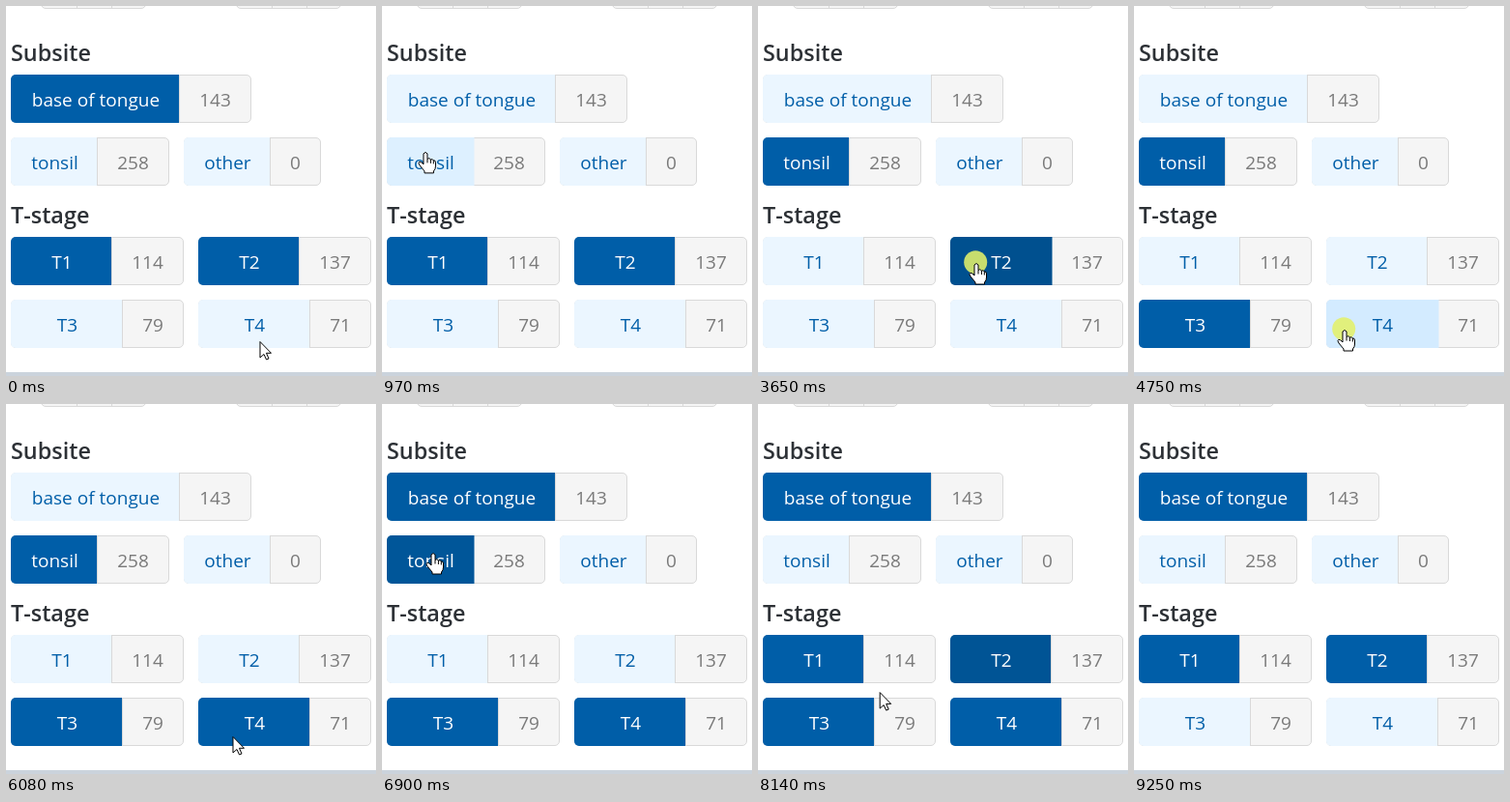
Animation of 383x383 px, one loop 9.89 s. Source, as an HTML page:

```html
<!DOCTYPE html>
<html lang="en">
<head>
<meta charset="utf-8">
<title>Filter buttons</title>
<style>
  html, body { margin: 0; height: 100%; overflow: hidden; background: #fff; }
  svg { display: block; width: 100%; height: 100%; cursor: default; }
  text { font: 19px "Open Sans", "Noto Sans", sans-serif; }
  .heading { font-size: 23.4px; font-weight: 600; font-kerning: none; fill: #2d3136; }
  .label, .count { text-anchor: middle; }
  .count { fill: #7a7a7a; }
  .box { fill: #f5f5f5; stroke: #d9d9d9; }
  .pointer { fill: #fff; stroke: #000; stroke-linejoin: round; }
</style>
</head>
<body>
<svg viewBox="0 0 383 383">
  <g id="page"></g>
  <circle id="press" cx="-.8" cy="-.8" r="12" fill="#e3f06a" opacity=".88"/>
  <path id="arrow" class="pointer" d="M0 .5V17L4 13.5L6.5 19L9 18L6.5 12.3H11.5Z"/>
  <path id="hand" class="pointer" d="M-2 2Q0-1 2 2V7.5Q4 5.5 5.4 8Q7.6 7 8.3 9Q10.5 8.5 10.5 11V15Q10.5 18 8.5 20V22H-1V20L-6 14Q-8 11-6.2 10.3Q-4.5 10-2 13ZM2 7.5V11.5M5.4 8V12M8.3 9V12.5"/>
</svg>
<script>
const LOOP = 9890, FADE = 150, HOVER_LAG = 35;
const ARRIVE = 90, HOLD = 130, LEAVE = 150; // ms around each press
const LEFT = 5, GAP = 15, HEIGHT = 50, RADIUS = 5;
const PALE = [235, 246, 255], PALE_HOVER = [211, 235, 255];
const BLUE = [0, 94, 168], BLUE_HOVER = [0, 80, 143];
const WHITE = [255, 255, 255];

// aim: where the pointer presses the button
const sections = [
  { title: "Subsite", rows: [
    [{ label: "base of tongue", count: 143, width: 249, on: true, aim: [34, 81] }],
    [{ label: "tonsil", count: 258, width: 164, aim: [45, 151] }, { label: "other", count: 0, width: 142 }],
  ] },
  { title: "T-stage", rows: [
    [{ label: "T1", count: 114, width: 179, on: true, aim: [75, 264] },
     { label: "T2", count: 137, width: 179, on: true, aim: [226, 266] }],
    [{ label: "T3", count: 79, width: 179, aim: [63, 310] },
     { label: "T4", count: 71, width: 179, aim: [218, 335] }],
  ] },
];
const buttons = sections.flatMap(section => section.rows.flat());
const clickable = buttons.filter(b => b.aim);

// Each stroke enters the stage, presses buttons at a steady pace and leaves.
const strokes = [
  { start: 0, end: 1580, from: [263, 347], to: [262, 400], first: 430, every: 640, targets: clickable.slice(0, 2) },
  { start: 2640, end: 5150, from: [217.5, 364], to: [228, 400], first: 2950, every: 577, targets: clickable.slice(2) },
  { start: 6080, end: 9250, from: [235, 344], to: [232, 400], first: 6495, every: 455, targets: clickable, shift: [8, 3] },
];
const presses = [];
for (const stroke of strokes) {
  const [dx, dy] = stroke.shift || [0, 0];
  stroke.keys = [{ time: stroke.start, point: stroke.from }];
  stroke.targets.forEach((button, i) => {
    const time = stroke.first + i * stroke.every;
    const point = [button.aim[0] + dx, button.aim[1] + dy];
    presses.push({ button, time });
    stroke.keys.push({ time: time - ARRIVE, point }, { time: time + LEAVE, point });
  });
  stroke.keys.push({ time: stroke.end, point: stroke.to });
}

function add(tag, attributes, content = "") {
  const node = document.createElementNS("http://www.w3.org/2000/svg", tag);
  for (const name in attributes) node.setAttribute(name, attributes[name]);
  node.textContent = content;
  return document.getElementById("page").appendChild(node);
}

function addBox(x, y, width, height) {
  add("rect", { class: "box", x: x + .5, y: y + .5, width: width - 1, height: height - 1, rx: RADIUS - .5 });
}

function addButton(b, x, y) {
  const right = x + b.width;
  const split = right - 42 - 11 * String(b.count).length;
  Object.assign(b, { x, y, split });
  addBox(x, y, b.width, HEIGHT);
  add("path", { class: "box", d: `M${split + .5} ${y}v${HEIGHT}` });
  b.face = add("path", {});
  b.text = add("text", { class: "label", x: (x + split) / 2 + 1, y: y + 33 }, b.label);
  add("text", { class: "count", x: (split + right) / 2, y: y + 33 }, b.count);
}

function buildPage() {
  for (const x of [36, 238]) {
    addBox(x, -47, 109, HEIGHT);
    for (const divider of [37, 73]) add("path", { class: "box", d: `M${x + divider + .5} 0V3` });
  }
  sections.forEach((section, s) => {
    const top = 71 + 168 * s;
    add("text", { class: "heading", x: LEFT, y: top - 14 }, section.title);
    section.rows.forEach((row, r) => {
      let x = LEFT;
      for (const b of row) {
        addButton(b, x, top + r * (HEIGHT + GAP));
        x += b.width + GAP;
      }
    });
  });
  add("rect", { y: 379, width: 383, height: 4, fill: "#cbd3dc" });
}

function faceShape({ x, y, split }, extra) {
  const r = RADIUS;
  return `M${x + r} ${y}H${split + extra}V${y + HEIGHT}H${x + r}a${r} ${r} 0 0 1-${r}-${r}V${y + r}a${r} ${r} 0 0 1 ${r}-${r}Z`;
}

function pointerAt(time) {
  const stroke = strokes.find(s => time >= s.start && time < s.end);
  if (!stroke) return [0, -99];
  const i = stroke.keys.findIndex(key => key.time > time);
  const a = stroke.keys[i - 1], b = stroke.keys[i];
  const p = (time - a.time) / (b.time - a.time), eased = p * p * (3 - 2 * p);
  return a.point.map((from, axis) => from + (b.point[axis] - from) * eased);
}

function hoveredAt(time) {
  const [x, y] = pointerAt(time - HOVER_LAG);
  return buttons.find(b => x >= b.x && x < b.split && y >= b.y && y < b.y + HEIGHT);
}

function selectedAt(button, time) {
  const toggles = presses.filter(p => p.button === button && p.time + HOLD <= time).length;
  return Boolean(button.on) !== (toggles % 2 === 1);
}

function faceColor(selected, hovered) {
  if (selected) return hovered ? BLUE_HOVER : BLUE;
  return hovered ? PALE_HOVER : PALE;
}

const average = colors => `rgb(${[0, 1, 2].map(i =>
  Math.round(colors.reduce((sum, c) => sum + c[i], 0) / colors.length))})`;

function place(id, [x, y], visible) {
  const node = document.getElementById(id);
  node.setAttribute("transform", `translate(${x} ${y})`);
  node.setAttribute("visibility", visible ? "visible" : "hidden");
}

function draw(time) {
  // A linear colour fade is the mean of the states over the last FADE ms.
  const recent = Array.from({ length: 12 }, (_, i) => (time - i * FADE / 12 + LOOP) % LOOP)
    .map(t => ({ t, hovered: hoveredAt(t) }));
  const hovered = recent[0].hovered;
  for (const b of buttons) {
    const states = recent.map(r => ({ selected: selectedAt(b, r.t), hovered: r.hovered === b }));
    b.face.setAttribute("d", faceShape(b, hovered === b ? 1.5 : 0));
    b.face.setAttribute("fill", average(states.map(s => faceColor(s.selected, s.hovered))));
    b.text.setAttribute("fill", average(states.map(s => s.selected ? WHITE : BLUE)));
  }
  const tip = pointerAt(time);
  place("press", tip, presses.some(p => time >= p.time && time < p.time + HOLD));
  place("arrow", tip, !hovered);
  place("hand", tip, hovered);
}

buildPage();
const start = performance.now();
function tick() {
  draw((performance.now() - start) % LOOP);
  requestAnimationFrame(tick);
}
tick();
</script>
</body>
</html>
```
